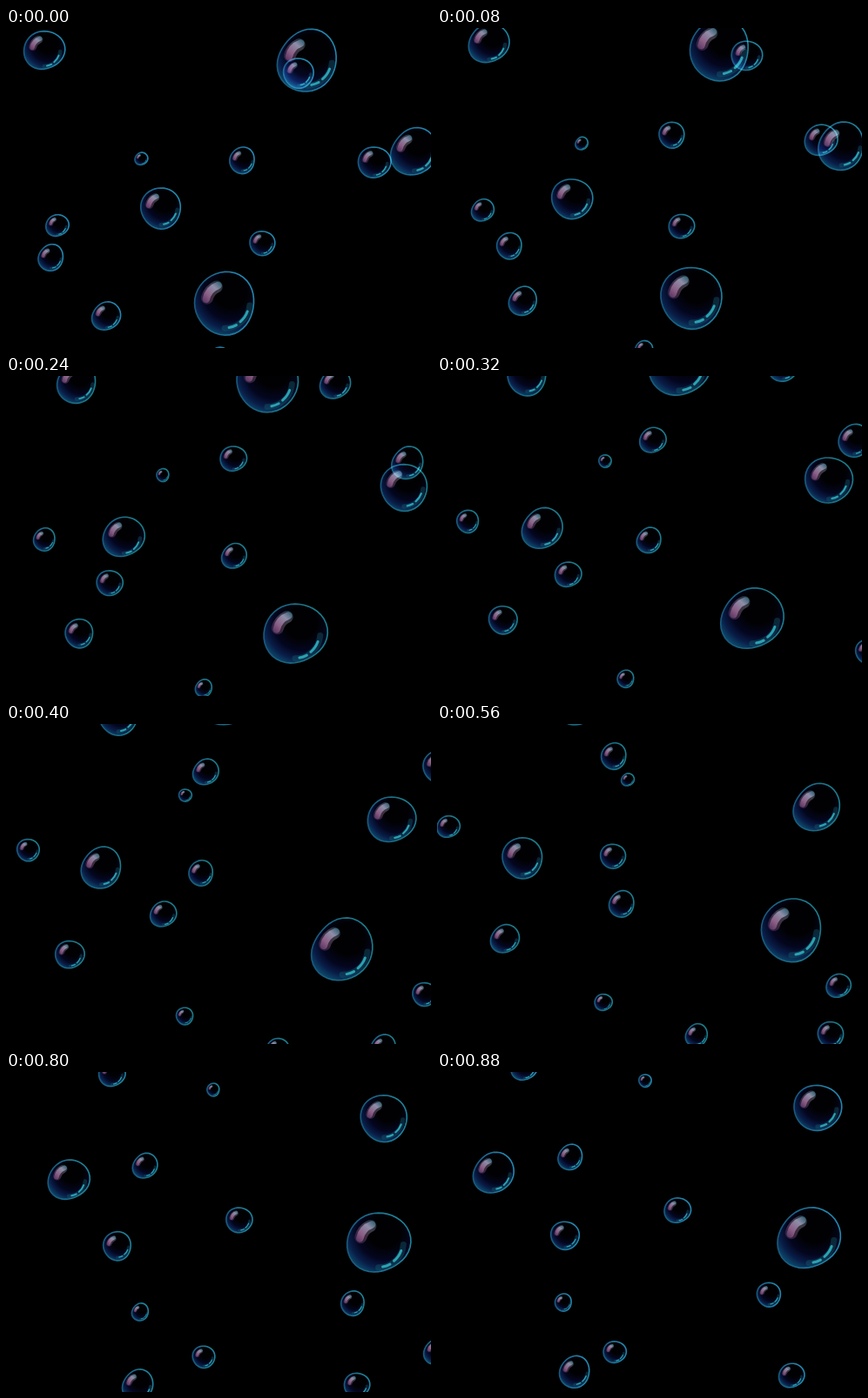
These frames come from a looping animation (488 px wide and 368 px high, 0.96 s). An HTML page:

```html
<!DOCTYPE html>
<html lang="en">
<head>
<meta charset="utf-8">
<title>Bubbles</title>
<style>
html, body { margin: 0; width: 100%; height: 100%; overflow: hidden; background: #000; }
svg { display: block; width: 488px; height: 368px; background: #000; isolation: isolate; }
.bubble { mix-blend-mode: screen; fill: none; stroke-linecap: round; }
.skin { fill: url(#body); stroke: url(#rim); stroke-width: 1.6; vector-effect: non-scaling-stroke; }
.halo { stroke: url(#shine); stroke-width: .4; opacity: .35; }
.shine { stroke: url(#shine); stroke-width: .24; opacity: .75; }
.glow { stroke: #14606e; stroke-width: .2; opacity: .4; }
.glint { stroke: #2ba2b2; stroke-width: .085; }
.edge { stop-color: var(--edge); }
</style>
</head>
<body>
<svg id="stage" viewBox="0 0 488 368">
  <defs>
    <radialGradient id="body" gradientUnits="userSpaceOnUse" cx=".2" cy="-.35" r="1.42">
      <stop offset=".36" stop-color="#010103"/>
      <stop offset=".64" stop-color="#04061f"/>
      <stop offset=".84" stop-color="#091d47"/>
      <stop offset="1" stop-color="#0c4467"/>
    </radialGradient>
    <linearGradient id="rim" gradientUnits="userSpaceOnUse" x1="-.9" y1=".1" x2=".6" y2="0">
      <stop offset="0" stop-color="#195a7c"/>
      <stop offset="1" class="edge"/>
    </linearGradient>
    <linearGradient id="shine" gradientUnits="userSpaceOnUse" x1="-.7" y1=".05" x2="-.05" y2="-.65">
      <stop offset="0" stop-color="#5c3262"/>
      <stop offset=".35" stop-color="#a5709b"/>
      <stop offset=".7" stop-color="#a9a9c6"/>
      <stop offset="1" stop-color="#2f6a80"/>
    </linearGradient>
  </defs>
</svg>
<script>
const STEP = 80, STEPS = 12, SIDES = 40;
const { sin, cos, PI } = Math;
const stage = document.getElementById('stage');
const bubbles = [];

function add(parent, cls, d = '', tag = 'path') {
  const el = document.createElementNS('http://www.w3.org/2000/svg', tag);
  el.setAttribute('class', cls);
  if (d) el.setAttribute('d', d);
  return parent.appendChild(el);
}

const polar = (r, a) => (r * cos(a)).toFixed(3) + ' ' + (r * sin(a)).toFixed(3);
const arc = (r, from, to) =>
  `M${polar(r, from * PI / 180)}A${r} ${r} 0 0 1 ${polar(r, to * PI / 180)}`;

// Radius, beat of the first point, then one point per beat
function bubble(r, beat, ...points) {
  const el = add(stage, 'bubble', '', 'g');
  const skin = add(el, 'skin');
  add(el, 'halo', arc(.6, 196, 244));
  add(el, 'shine', arc(.62, 192, 250));
  add(el, 'glow', arc(.82, 5, 90));
  add(el, 'glint', arc(.79, 20, 50));
  add(el, 'glint', arc(.81, 62, 80));
  bubbles.push({ el, skin, r, beat, points, seed: bubbles.length * 2.4 });
}

// Polynomial through equally spaced points
function along(points, u) {
  let x = 0, y = 0;
  points.forEach(([px, py], i) => {
    let w = 1;
    points.forEach((_, j) => { if (j !== i) w *= (u - j) / (i - j); });
    x += w * px;
    y += w * py;
  });
  return [x, y];
}

// Wobbling outline of unit size, leaning up to the right
function blob(seed, t) {
  const sway = seed + t * .9;
  let d = '';
  for (let i = 0; i < SIDES; i++) {
    const a = i / SIDES * 2 * PI;
    const r = 1 + .03 * cos(2 * a + PI / 2) + .04 * cos(2 * a + sway)
      + .02 * cos(3 * a - sway);
    d += (i ? 'L' : 'M') + polar(r, a);
  }
  return d + 'Z';
}

bubble(23.5, 0, [31, 33], [81, 8], [161, -21]);
bubble(35.5, 0, [367, 48], [300, 7], [230, -60]);
bubble(18, 0, [316, 72], [378, 9]);
bubble(8, 0, [147, 169], [180, 114], [219, 64], [239, 10]);
bubble(15.5, 0, [267, 186], [261, 95], [203, 37], [100, -5]);
bubble(19, 0, [405, 180], [461, 100]);
bubble(27.5, 0, [470, 148], [457, 128], [436, 96], [437, 41]);
bubble(24, 0, [206, 219], [135, 185], [98, 154], [65, 116]);
bubble(13.5, 0, [64, 243], [44, 188], [13, 118]);
bubble(15.5, 0, [21, 281], [119, 238], [212, 207], [276, 159]);
bubble(15, 0, [304, 268], [262, 207], [202, 152], [153, 98]);
bubble(17, 0, [134, 350], [84, 296], [78, 247], [147, 188]);
bubble(36, 0, [205, 315], [332, 296], [407, 237], [427, 191]);
bubble(10.5, 1, [227, 359], [191, 320], [145, 265]);
bubble(13.5, 1, [310, 406], [298, 358], [204, 322]);
bubble(15.5, 2, [452, 357], [504, 314]);
bubble(14.5, 1, [504, 320], [461, 301], [381, 256]);
bubble(15, 2, [384, 410], [407, 349]);
bubble(18.5, 2, [121, 430], [158, 345]);

function draw(ms) {
  const t = Math.floor(ms / STEP) % STEPS;
  // The drift surges and rests once every four steps
  const beat = (t + 1 + .28 * (1 + sin(PI / 2 * t))) / 4;
  // Rims turn bluer and brighter around the loop point
  const blue = cos(PI * (t + .5) / STEPS) ** 12;
  stage.style.setProperty('--edge', `hsl(${188 + 10 * blue}, 66%, ${33 + 9 * blue}%)`);
  for (const b of bubbles) {
    const [x, y] = along(b.points, beat - b.beat);
    b.el.setAttribute('transform', `translate(${x.toFixed(2)} ${y.toFixed(2)}) scale(${b.r - .8})`);
    b.skin.setAttribute('d', blob(b.seed, t));
  }
}

const start = performance.now();
function tick() {
  draw(performance.now() - start);
  requestAnimationFrame(tick);
}
tick();
</script>
</body>
</html>
```
